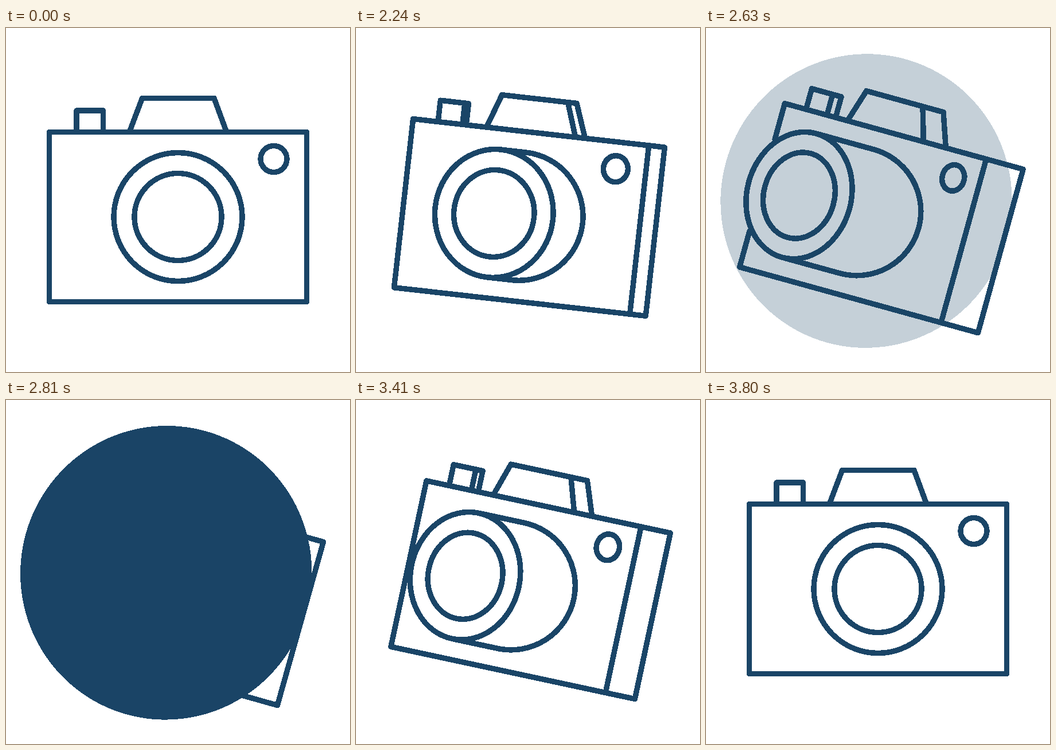
Write an HTML page that moves like this. It is 600x600 px and loops after 3.83 s.

```html
<!DOCTYPE html>
<html lang="en">
<head>
<meta charset="utf-8">
<title>Camera</title>
<style>
  html, body { margin: 0; width: 100%; height: 100%; overflow: hidden; background: #fff; }
  svg { display: block; width: 100%; height: 100%; shape-rendering: crispEdges; }
  #lines { fill: none; stroke: #1a4567; stroke-width: 9.5; stroke-linecap: round; stroke-linejoin: round; }
  #flash { fill: #1a4466; }
</style>
</head>
<body>
<svg viewBox="0 0 600 600">
  <g id="camera">
    <g id="lines">
      <path id="body"/>
      <path id="prism"/>
      <path id="shutter"/>
      <path id="barrel"/>
      <ellipse id="rim"/>
      <ellipse id="glass"/>
      <ellipse id="window"/>
    </g>
    <ellipse id="flash"/>
  </g>
</svg>
<script>
const LOOP = 3830, REST = 2030, STEP = 30;
const TURN = 2015, BACK = 3074, SPAN = 720;
const FLASH = 2810, FADE = 240;
const HEIGHT = 296, MID = HEIGHT / 2, LENS = 112, COVER = 4.5;
const $ = id => document.getElementById(id);
const clamp = x => Math.min(1, Math.max(0, x));
const mix = (a, b, p) => a + (b - a) * p;

function bezier(a, b, t) {
  const s = 1 - t;
  return 3 * s * s * t * a + 3 * s * t * t * b + t * t * t;
}

// Easing curve (.3, .05, .35, 1), solved by bisection
function ease(x) {
  if (x <= 0 || x >= 1) return clamp(x);
  let lo = 0, hi = 1;
  for (let i = 0; i < 30; i++) {
    const m = (lo + hi) / 2;
    if (bezier(.3, .35, m) < x) lo = m; else hi = m;
  }
  return bezier(.05, 1, lo);
}

function set(id, attrs) {
  for (const key in attrs) $(id).setAttribute(key, attrs[key]);
}

function oval(id, cx, cy, rx, ry) {
  set(id, { cx, cy, rx, ry });
}

// Box on the top edge: outline of front and side, plus the edge between them
function topBox(id, x0, x1, x2, x3, h, k, depthTop, depthFoot) {
  const foot = -2;
  set(id, { d: `M${x0 * k} ${foot}L${x1 * k} ${-h}H${x2 * k + depthTop}` +
    `L${x3 * k + depthFoot} ${foot}M${x2 * k} ${-h}L${x3 * k} ${foot}` });
}

// p runs from the front view (0) to the turned view (1)
function pose(p) {
  const front = mix(449, 363, p), k = front / 449;
  const width = front + 68 * p;
  set('camera', { transform:
    `translate(${mix(300, 306, p)} ${mix(329.5, 331.7, p)}) ` +
    `rotate(${15.7 * p}) translate(${-width / 2} ${-MID})` });

  const rimX = mix(224.5, 64, p), rimR = LENS * k;
  const backX = mix(224.5, 170, p);

  // The left edge stops where the lens covers it
  const reach = rimX / (rimR + COVER);
  const gap = reach < 1 ? (LENS + COVER) * Math.sqrt(1 - reach * reach) : 0;
  set('body', { d: `M0 ${MID - gap}V0H${width}V${HEIGHT}H0V${MID + gap}` +
    `M${front} 0V${HEIGHT}` });

  topBox('prism', 140.5, 162, 287.5, 308.5, 59, k, 38 * p, 41 * p);
  topBox('shutter', 47.5, 47.5, 94, 94, 37.5, k, 16 * p, 16 * p);

  set('barrel', { d: `M${rimX} ${MID - LENS}H${backX}` +
    `a${LENS} ${LENS} 0 0 1 0 ${2 * LENS}H${rimX}` });
  oval('rim', rimX, MID, rimR, LENS);
  oval('glass', rimX, MID, 76 * k, 76);
  oval('window', 391.5 * k, 47, mix(23, 19.2, p), 23);
  oval('flash', front / 2, 126, 254, 256.5);
}

function draw() {
  let t = performance.now() % LOOP;
  t = t < REST ? 0 : REST + Math.floor((t - REST) / STEP) * STEP;
  pose(ease(t < BACK ? (t - TURN) / SPAN : 1 - (t - BACK) / SPAN));
  set('flash', { opacity: clamp(1 - Math.abs(t - FLASH) / FADE) });
  requestAnimationFrame(draw);
}
draw();
</script>
</body>
</html>
```
